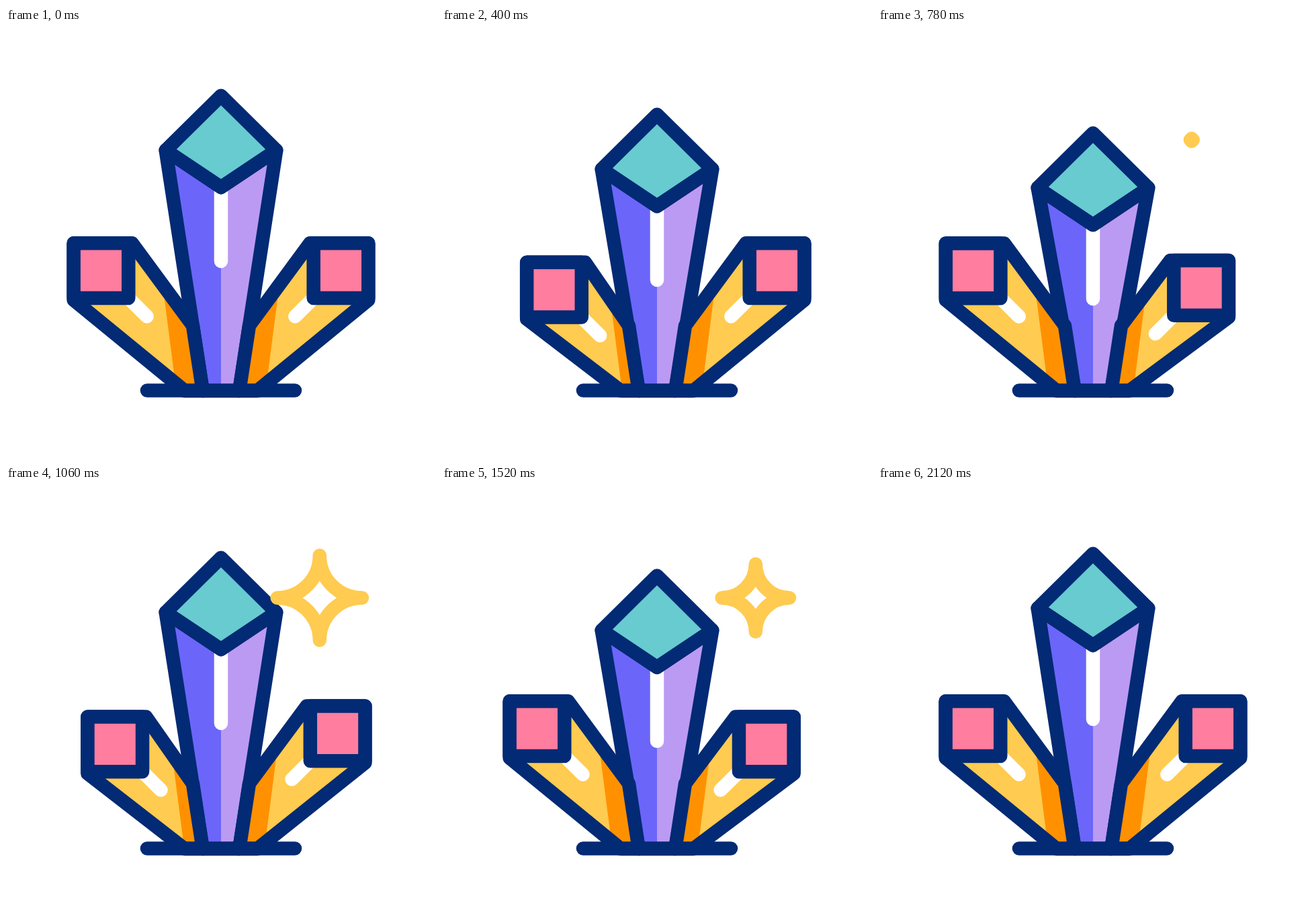
An HTML page with a canvas for the animation above (2400 ms loop, 640 px wide and 640 px high).

```html
<!DOCTYPE html>
<html lang="en">
<head>
<meta charset="utf-8">
<title>Crystals</title>
<style>
  html, body { margin: 0; width: 100%; height: 100%; overflow: hidden; background: #fff; }
  canvas { display: block; width: 640px; height: 640px; }
</style>
</head>
<body>
<canvas id="stage" width="640" height="640"></canvas>
<script>
const ctx = document.getElementById('stage').getContext('2d');
const LOOP = 2400, TICK = 20, LINE = 20.5;
const NAVY = '#032a74', YELLOW = '#ffcb50', ORANGE = '#ff9100', PINK = '#ff7d9f',
      TEAL = '#67cbd0', BLUE = '#6b66f9', LILAC = '#bb9af3', WHITE = '#fff';

// Keys are [tick, value] pairs, eased in and out between neighbours.
const CENTER = [[0, 0], [40, 56], [50, 0], [65, 56], [90, 0]];
const LEFT = [[0, 0], [20, 1], [40, 0], [58, 1], [75, 0]];
const RIGHT = [[20, 0], [40, 1], [60, 0], [80, 1], [95, 0]];
const SPARK = [[37.8, 0], [50, 66], [65, 39], [90, 66], [105, 0]];

function valueAt(keys, t) {
  if (t <= keys[0][0]) return keys[0][1];
  for (let i = 1; i < keys.length; i++) {
    const [t0, a] = keys[i - 1], [t1, b] = keys[i];
    if (t < t1) {
      const p = (t - t0) / (t1 - t0);
      return a + (b - a) * p * p * (3 - 2 * p);
    }
  }
  return keys[keys.length - 1][1];
}

function trace(points) {
  ctx.beginPath();
  points.forEach(([x, y]) => ctx.lineTo(x, y));
}

function shape(points, fill, outline) {
  trace(points);
  ctx.closePath();
  if (fill) {
    ctx.fillStyle = fill;
    ctx.fill();
  }
  if (outline) {
    ctx.strokeStyle = outline;
    ctx.stroke();
  }
}

function line(x0, y0, x1, y1, color) {
  trace([[x0, y0], [x1, y1]]);
  ctx.strokeStyle = color;
  ctx.stroke();
}

function centerCrystal(dy) {
  const mid = 182 + dy, low = 237 + dy;
  shape([[237.7, mid], [320, low], [320, 540], [292.8, 540]], BLUE);
  shape([[402.3, mid], [320, low], [320, 540], [347.2, 540]], LILAC);
  line(320, low, 320, 347 + dy, WHITE);
  shape([[237.7, mid], [320, low], [402.3, mid], [347.2, 540], [292.8, 540]], null, NAVY);
  shape([[320, 100.7 + dy], [402.3, mid], [320, low], [237.7, mid]], TEAL, NAVY);
}

// Drawn as the left one; the right one is its mirror image.
function sideCrystal(dx, dy, shade, mirror) {
  const x = 100.7 + dx, y = 320.2 + dy;
  const body = [[x, y], [x + 86.8, y], [278, 443], [292.8, 540], [266, 540], [x, y + 84.5]];
  ctx.save();
  if (mirror) {
    ctx.translate(640, 0);
    ctx.scale(-1, 1);
  }
  shape(body, YELLOW);
  ctx.save();
  trace(body);
  ctx.clip();
  shape([[222.5 + shade, 300], [300, 300], [300, 540], [253.5 + shade, 540]], ORANGE);
  ctx.restore();
  line(x + 81.6, y + 81.8, x + 109, y + 109, WHITE);
  shape(body, null, NAVY);
  shape([[x, y], [x + 81.6, y], [x + 81.6, y + 81.8], [x, y + 81.8]], PINK, NAVY);
  ctx.restore();
}

function sparkle(r) {
  if (r <= 0.05) return;
  const x = 466.8, y = 166.5, q = Math.PI / 2;
  ctx.beginPath();
  ctx.arc(x + r, y - r, r, 2 * q, q, true);
  ctx.arc(x + r, y + r, r, 3 * q, 2 * q, true);
  ctx.arc(x - r, y + r, r, 0, -q, true);
  ctx.arc(x - r, y - r, r, q, 0, true);
  ctx.closePath();
  ctx.strokeStyle = YELLOW;
  ctx.stroke();
}

function draw(ms) {
  const t = ms / TICK;
  ctx.fillStyle = WHITE;
  ctx.fillRect(0, 0, 640, 640);
  ctx.lineWidth = LINE;
  ctx.lineCap = ctx.lineJoin = 'round';

  const l = valueAt(LEFT, t), r = valueAt(RIGHT, t);
  centerCrystal(valueAt(CENTER, t));
  sideCrystal(25.5 * l, 28.5 * l, 14.5 * l, false);
  sideCrystal(17.5 * r, 26 * r, 6.5 * r, true);
  line(210, 539.5, 430, 539.5, NAVY);
  sparkle(valueAt(SPARK, t));
}

const start = performance.now();
function loop() {
  draw((performance.now() - start) % LOOP);
  requestAnimationFrame(loop);
}
loop();
</script>
</body>
</html>
```
